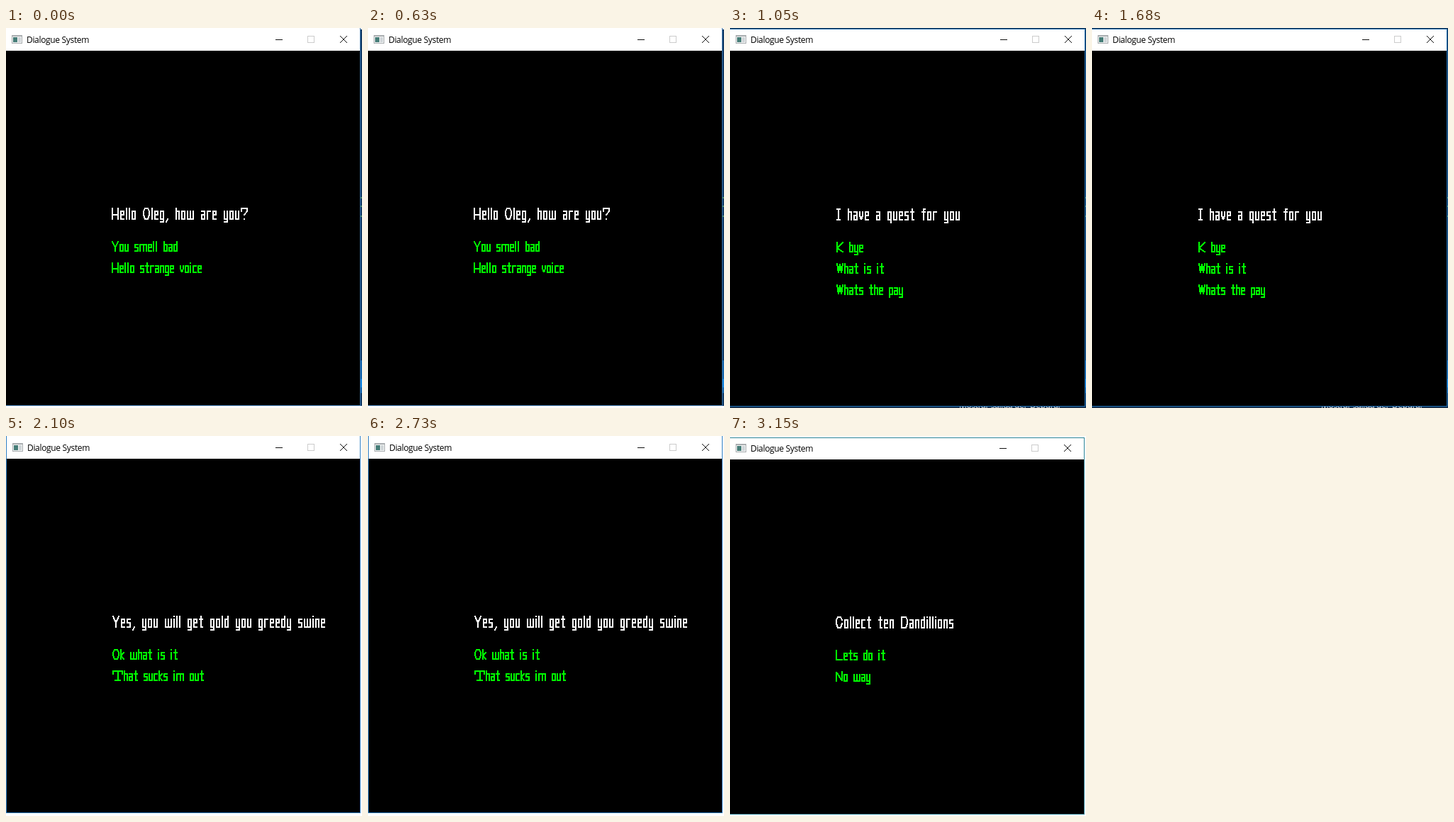
An HTML page for the animation above (4200 ms loop, 502 px wide and 535 px high).

```html
<!DOCTYPE html>
<html lang="en">
<head>
<meta charset="utf-8">
<title>Dialogue System</title>
<style>
  html, body { margin: 0; width: 100%; height: 100%; overflow: hidden; background: #fff; }
  svg { display: block; }
  text { font-family: "Open Sans", "Noto Sans", sans-serif; font-size: 12px; letter-spacing: -0.33px; }
  .letters { fill: none; stroke-width: 2; stroke-linecap: square; stroke-miterlimit: 2; }
</style>
</head>
<body>
<svg id="stage" width="502" height="535" viewBox="0 0 502 535"></svg>
<script>
// Letters are strokes through a grid of points, five per row:
// abcde cap line, fghij x-height, klmno middle, pqrst baseline, uvwxy descender.
const rows = [0, 4, 9, 15, 19];
const strokes = {
  a: 'fjtpko', b: 'aptjf', c: 'jfpt', d: 'etpfj', e: 'tpfjok', f: 'ecr fj', g: 'tpfjyu',
  h: 'ap fjt', i: 'fp aa', k: 'ap jkt', l: 'ap', m: 'pfjt hr', n: 'pfjt', o: 'fptjf',
  p: 'ufjtp', q: 'yjfpt', r: 'pfj', s: 'jfkotp', t: 'crt fj', u: 'fptj', v: 'fkroj',
  w: 'fptj hr', y: 'fpt jyu', C: 'jdbfkqso', D: 'apsojda', H: 'ap et ko', K: 'ap ekt',
  I: 'ae cr pt', L: 'apt', N: 'pate', O: 'bdjosqkfb', T: 'faej cr qs', W: 'aqcse', Y: 'ame mr',
  ',': 'tu', '?': 'faejm rr', ' ': ''
};

function advance(ch) {
  if ('il'.includes(ch)) return 4;
  if (ch === ',') return 6;
  if (ch === 'm') return 14;
  if (ch === 'T') return 18;
  return /[wCDHKLNOWY?]/.test(ch) ? 12 : 8;
}

function lettering(text, x, y, scale, color) {
  let path = '';
  for (const ch of text) {
    const step = Math.round(advance(ch) * scale), span = step - Math.floor(4 * scale);
    for (const line of strokes[ch].split(' ').filter(Boolean)) {
      path += 'M' + [...line].map(p => {
        const n = p.charCodeAt(0) - 97;
        return `${x + 1 + Math.round(span * (n % 5) / 4)} ${y + 1 + Math.round(rows[n / 5 | 0] * scale)}`;
      }).join('L');
    }
    x += step;
  }
  return `<path class="letters" role="img" aria-label="${text}" d="${path}" stroke="${color}" shape-rendering="crispEdges"/>`;
}

const rect = (x, y, w, h, fill) => `<rect x="${x}" y="${y}" width="${w}" height="${h}" fill="${fill}"/>`;

// The sliver of desktop to the right of the window.
const desktop = x => rect(x, 2, 3, 530, '#123b66')
  + [238, 250, 264].map(y => rect(500, y, 2, 2, '#4b8b6b')).join('')
  + rect(x, 468, 3, 46, '#1766ad') + rect(x, 494, 3, 12, '#1686e0');

const scenes = [
  { say: 'Hello Oleg, how are you?', replies: ['You smell bad', 'Hello strange voice'],
    barX: 0, barY: 0, textX: 149, textY: 253, buttons: 0,
    left: 0, top: 0, right: 499, bottom: 531, edge: '#356fa5', behind: desktop(499) },
  { say: 'I have a quest for you', replies: ['K bye', 'What is it', 'Whats the pay'],
    barX: 0, barY: 0, textX: 150, textY: 254, buttons: 1,
    left: 0, top: 2, right: 500, bottom: 532, edge: '#1f6cad',
    behind: rect(0, 0, 502, 535, '#14304f') + desktop(501)
      + '<text x="323" y="535" fill="#e8edf2">Mostrar salida de: &#160;Depurar</text>' },
  { say: 'Yes, you will get gold you greedy swine', replies: ['Ok what is it', 'That sucks im out'],
    barX: 1, barY: 0, textX: 150, textY: 253, buttons: 0,
    left: 1, top: 0, right: 499, bottom: 530, edge: '#2f7fc4', behind: '' },
  { say: 'Collect ten Dandillions', replies: ['Lets do it', 'No way'],
    barX: 0, barY: 1, textX: 149, textY: 254, buttons: 0,
    left: 0, top: 3, right: 499, bottom: 532, edge: '#2b8496', behind: '' }
];

function titleBar({ barX, barY, buttons }) {
  const icon = rect(8, 10, 15, 12, '#a9adb0') + rect(9, 12, 13, 9, '#f3f5f5')
    + rect(10, 13, 6, 7, '#467d78') + rect(17, 13, 4, 7, '#cfd5d8');
  return `<g transform="translate(${barX} ${barY})">${icon}
    <text x="29" y="20.5">Dialogue System</text></g>
    <g transform="translate(${buttons} ${barY})" fill="none" stroke="#111">
    <path d="M380 16.5H390M471 11L481 21M481 11L471 21"/>
    <rect x="425.5" y="11.5" width="9" height="9" stroke="#ccc"/></g>`;
}

function draw(s) {
  const { left, top, right, bottom } = s, barEnd = 32 + s.barY, edgeTop = Math.max(top - 1, 0);
  return rect(0, 0, 502, 535, '#fff') + s.behind
    + rect(0, edgeTop, right + 1, bottom + 1 - edgeTop, s.edge)
    + rect(left, top, right - left, barEnd - top, '#fff')
    + rect(left, barEnd, right - left, bottom - barEnd, '#000')
    + titleBar(s)
    + lettering(s.say, s.textX, s.textY, 1, '#fff')
    + s.replies.map((r, i) => lettering(r, s.textX, s.textY + 47 + i * 30, 0.875, '#0f0')).join('');
}

const stage = document.getElementById('stage');
let shown = -1;
function tick() {
  const now = Math.floor(performance.now() / 1050) % scenes.length;
  if (now !== shown) stage.innerHTML = draw(scenes[shown = now]);
  requestAnimationFrame(tick);
}
tick();
</script>
</body>
</html>
```
